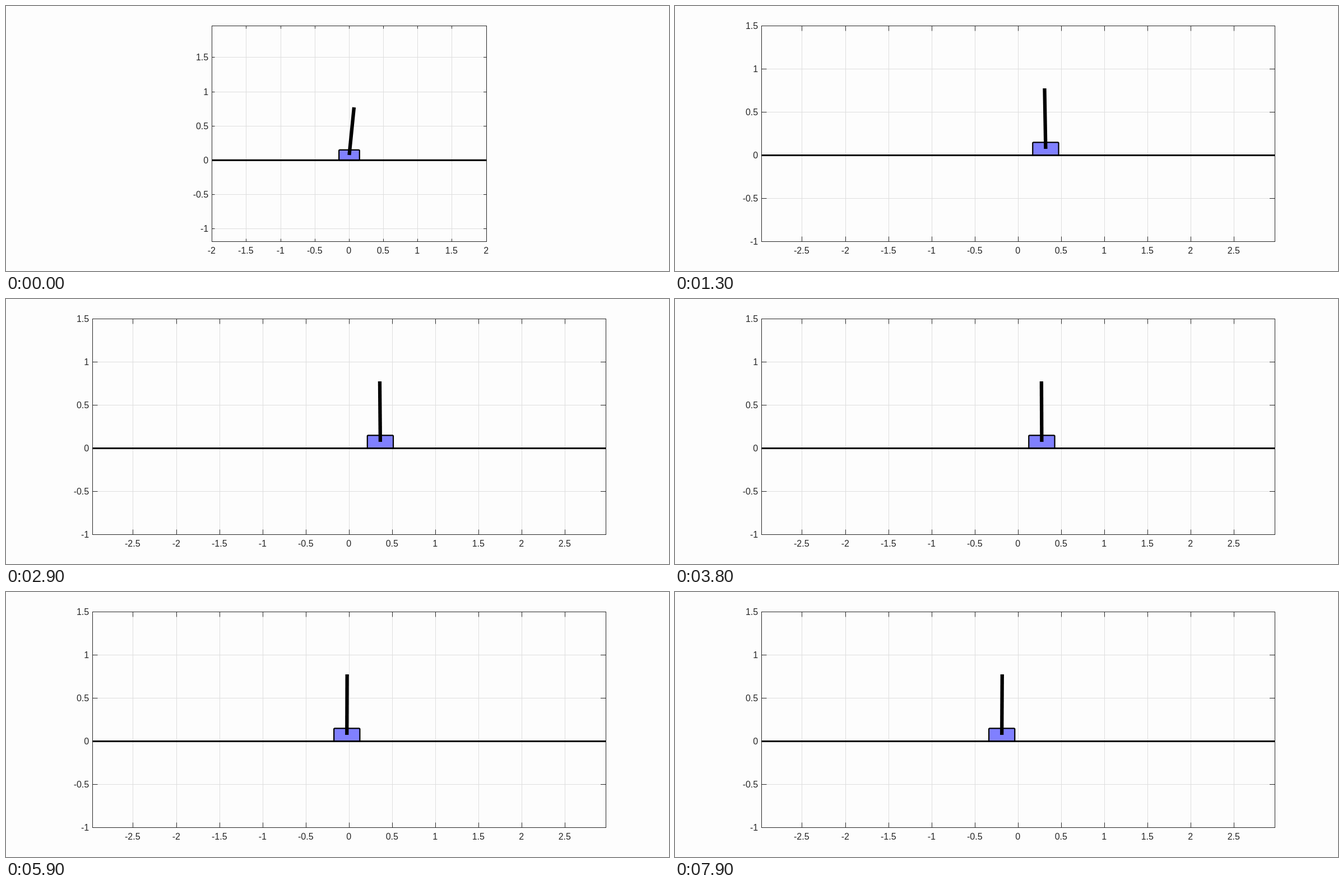
An HTML page with a canvas for the animation above (8000 ms loop, 1183 by 473 pixels).

```html
<!DOCTYPE html>
<html>
<head>
<meta charset="utf-8">
<style>
html, body { margin: 0; width: 100%; height: 100%; overflow: hidden; background: #fdfdfd; }
canvas { display: block; }
</style>
</head>
<body>
<canvas id="stage" width="1183" height="473"></canvas>
<script>
const ctx = document.getElementById('stage').getContext('2d');
const LOOP = 8000, STEP = 100;
const TOP = 35.5, BOTTOM = 420.5, CENTER = 612.4;

// Axes before and after the plot widens
const narrow = { left: 367.5, right: 857, unit: 122.3, zero: 275.2, tick: 5, xMax: 2, yMin: -1 };
const wide = { left: 154.5, right: 1070, unit: 154.2, zero: 266.5, tick: 9, xMax: 2.5, yMin: -1 };

const { sin, cos, exp } = Math;
const crisp = v => Math.floor(v) + 0.5;

// Cart position and pole angle: slow sway, creeping decay and a fast catch
function pose(t) {
  const a = 0.112, w = 0.507, s = t - 5.7;
  const sway = 0.27 * exp(-a * s), creep = exp(-1.13 * t), fast = exp(-3.2 * t);
  const sn = sin(w * s), cs = cos(w * s);
  return {
    x: -sway * sn - 0.142 * creep + fast * (0.015 * cos(3.1 * t) - 0.113 * sin(3.1 * t)),
    angle: sway * ((w * w - a * a) * sn + 2 * a * w * cs) / 9.8
      - 0.014 * creep + fast * (0.123 * cos(3.1 * t) + 0.122 * sin(3.1 * t))
  };
}

function line(x1, y1, x2, y2, color, width = 1) {
  ctx.strokeStyle = color;
  ctx.lineWidth = width;
  ctx.beginPath();
  ctx.moveTo(x1, y1);
  ctx.lineTo(x2, y2);
  ctx.stroke();
}

function drawAxes({ left, right, unit, zero, tick, xMax, yMin }) {
  const grid = '#dedede', ink = '#262626';
  ctx.font = '16px "Liberation Sans", Arial, sans-serif';
  ctx.fillStyle = ink;

  ctx.textAlign = 'center';
  for (let v = -xMax; v <= xMax; v += 0.5) {
    const x = crisp(CENTER + v * unit);
    line(x, TOP, x, BOTTOM, grid);
    line(x, TOP, x, TOP + tick, ink);
    line(x, BOTTOM, x, BOTTOM - tick, ink);
    ctx.fillText(v, x - 0.7, 441.5);
  }

  ctx.textAlign = 'right';
  for (let v = yMin; v <= 1.5; v += 0.5) {
    const y = crisp(zero - v * unit + 0.2);
    line(left, y, right, y, grid);
    line(left, y, left + tick, y, ink);
    line(right, y, right - tick, y, ink);
    ctx.fillText(v, left - 6.3, y + 5.7);
  }

  ctx.strokeStyle = ink;
  ctx.lineWidth = 1;
  ctx.strokeRect(left, TOP, crisp(right) - left - 0.5 + 0.5, BOTTOM - TOP);
}

function drawCart({ left, right, unit, zero }, { x, angle }) {
  const cx = CENTER + x * unit, pivot = zero - 0.075 * unit;
  ctx.fillStyle = '#8080ff';
  ctx.strokeStyle = '#000';
  ctx.lineWidth = 2.2;
  ctx.beginPath();
  ctx.roundRect(cx - 0.15 * unit, zero - 0.15 * unit, 0.3 * unit, 0.15 * unit, 1.5);
  ctx.fill();
  ctx.stroke();
  line(left, zero, right, zero, '#000', 3);
  line(cx, pivot, cx + 0.7 * unit * sin(angle), pivot - 0.7 * unit * cos(angle), '#000', 6.3);
}

function render() {
  const time = Math.floor(performance.now() % LOOP / STEP) * STEP;
  const axes = time < STEP ? narrow : wide;
  ctx.fillStyle = '#fdfdfd';
  ctx.fillRect(0, 0, 1183, 473);
  drawAxes(axes);
  drawCart(axes, pose(time / 1000));
  requestAnimationFrame(render);
}
render();
</script>
</body>
</html>
```
